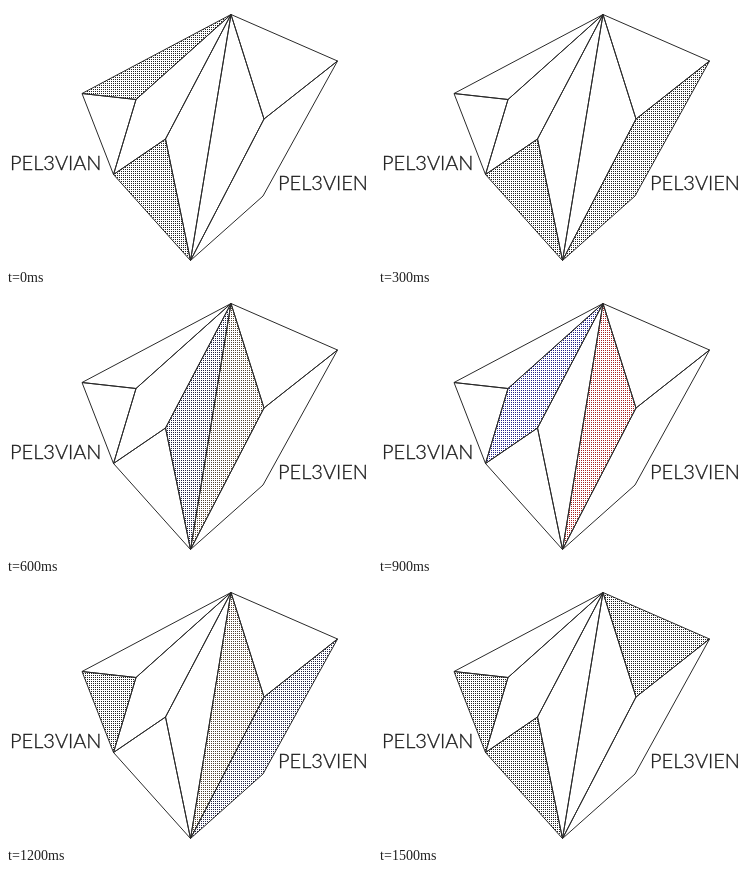
An HTML page that plays this animation: 366x261 px, repeating every 1.8 s.

```html
<!DOCTYPE html>
<html lang="en">
<head>
<meta charset="utf-8">
<title>Faceted crystal</title>
<style>
  html, body { margin: 0; width: 100%; height: 100%; overflow: hidden; background: #fff; }
  svg { display: block; width: 366px; height: 261px; }
  polygon { stroke: #2a2a2a; stroke-linejoin: round; }
  text { font: 300 20px Lato, "Open Sans", sans-serif; fill: #1a1a1a; stroke: #1a1a1a; stroke-width: .3; }
</style>
</head>
<body>
<svg viewBox="0 0 366 261">
  <defs id="patterns"></defs>
  <g id="crystal"></g>
  <text x="4" y="164">PEL3VIAN</text>
  <text x="272" y="184">PEL3VIEN</text>
</svg>
<script>
const points = {
  top: [225, 8.5], right: [331.5, 55], notch: [258, 113], heel: [257, 190],
  foot: [184.5, 254.5], hip: [107.5, 168.5], left: [76, 87.5], brow: [130, 93.5], knee: [159.5, 133]
};

const faces = {
  crown: 'left top brow',
  cheek: 'left brow hip',
  band: 'brow top knee hip',
  base: 'hip knee foot',
  innerLeft: 'top knee foot',
  innerRight: 'top notch foot',
  shoulder: 'top right notch',
  flank: 'notch right heel foot'
};

const inks = { black: '#222', navy: '#224', brown: '#543', blue: '#228', red: '#a22' };

// Dotted faces and their ink at each step of the loop
const steps = [
  { crown: 'black', base: 'black' },
  { base: 'black', flank: 'black' },
  { innerLeft: 'navy', innerRight: 'brown' },
  { band: 'blue', innerRight: 'red' },
  { cheek: 'black', innerRight: 'brown', flank: 'navy' },
  { cheek: 'black', base: 'black', shoulder: 'black' }
];
const stepTime = 300;

function add(parent, tag, attributes) {
  const node = document.createElementNS('http://www.w3.org/2000/svg', tag);
  for (const [key, value] of Object.entries(attributes)) node.setAttribute(key, value);
  return parent.appendChild(node);
}

for (const [id, fill] of Object.entries(inks)) {
  const pattern = add(document.getElementById('patterns'), 'pattern',
    { id, x: 1, y: 1, width: 2, height: 2, patternUnits: 'userSpaceOnUse' });
  add(pattern, 'rect', { width: 1, height: 1, fill, 'shape-rendering': 'crispEdges' });
}

const crystal = document.getElementById('crystal');
const shapes = Object.entries(faces).map(([name, corners]) => [
  name,
  add(crystal, 'polygon', { points: corners.split(' ').map(c => points[c]).join(' ') })
]);

function draw() {
  const lit = steps[Math.floor(performance.now() / stepTime) % steps.length];
  for (const [name, shape] of shapes) {
    shape.setAttribute('fill', lit[name] ? `url(#${lit[name]})` : 'none');
  }
  requestAnimationFrame(draw);
}
draw();
</script>
</body>
</html>
```
